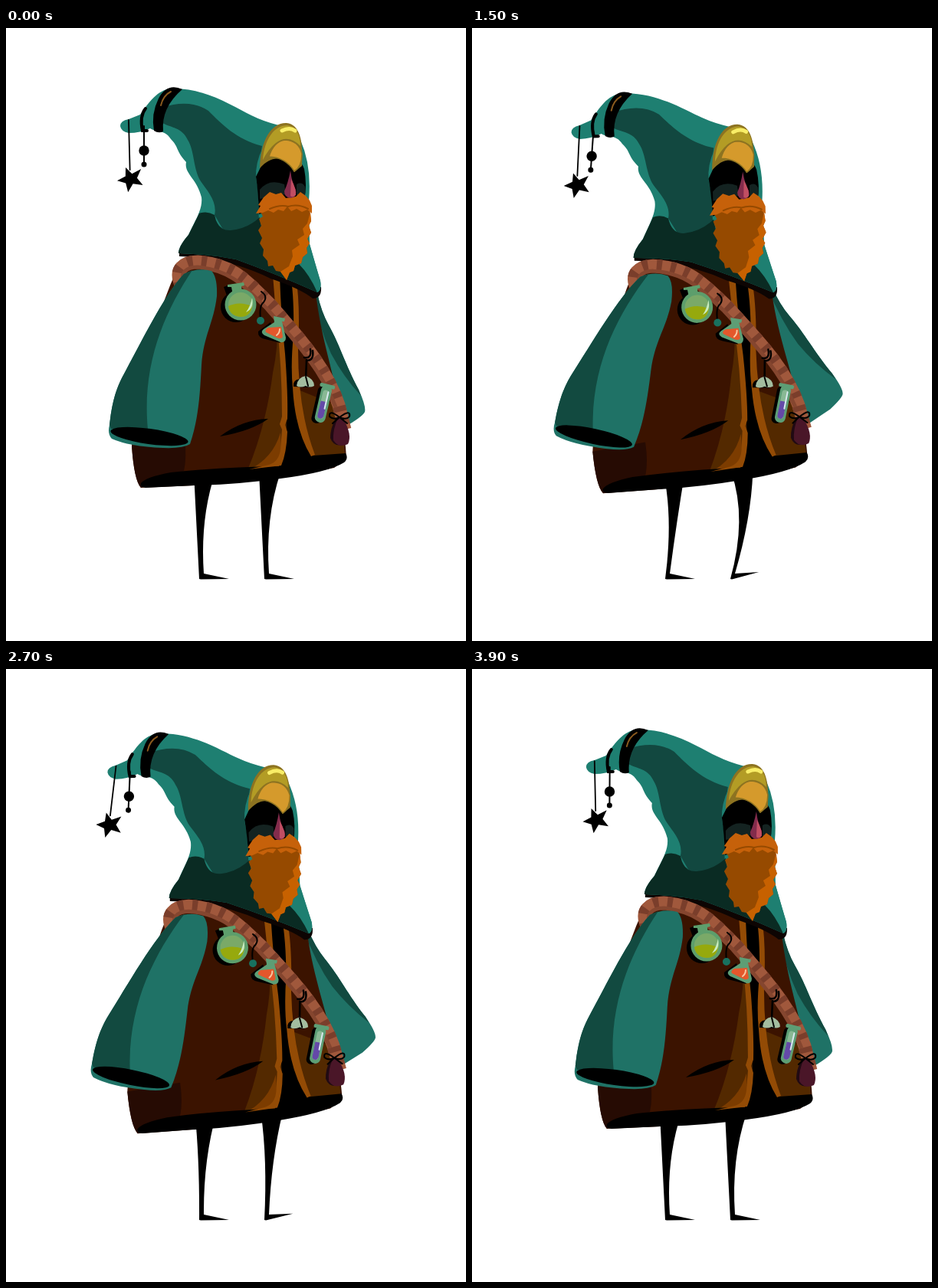
Animation of 600x800 px, one loop 4 s. Source, as an HTML page:

```html
<!DOCTYPE html>
<html lang="en">
<head>
<meta charset="utf-8">
<title>Swaying wizard</title>
<style>
html, body { margin: 0; width: 100%; height: 100%; overflow: hidden; background: #fff; }
svg { display: block; width: 600px; height: 800px; }
.line { fill: none; stroke: #000; stroke-linecap: round; }
</style>
</head>
<body>
<svg viewBox="0 0 600 800">
  <path id="legL"/>
  <path id="legR"/>
  <g id="body">
    <g id="armR">
      <path fill="#1f7266" d="M385 335L406 346Q411 370 421 388C436 415 442 438 460 472Q470 494 468 501Q466 506 448 517L416 530Z"/>
      <path fill="#124a40" d="M400 345L406 346Q411 370 421 388C436 415 442 438 460 472L463 480Q440 455 424 425Q408 390 400 345Z"/>
    </g>

    <g id="coat">
      <path fill="#3b1300" d="M225 310L300 295L404 345C412 420 440 480 444 562L428 574L360 587L245 597L176 600Q167 590 164 545Q172 430 225 310Z"/>
      <path fill="#260b03" d="M164 545L233 535Q236 560 232 578L176 600Q167 590 164 545Z"/>
      <path fill="#532900" d="M352 320Q359 400 348 450Q339 520 315 577L362 572L368 515L358 320Z"/>
      <path fill="#7c3c00" d="M358 528Q348 562 316 577L360 572Z"/>
      <path fill="#532900" d="M376 470L425 490L438 510L442 556L400 560Z"/>
      <path d="M354 320H376L376 440Q378 515 401 558L443 555Q447 562 441 567Q420 580 358 588Q300 596 245 597L182 600Q174 599 176 594Q182 586 215 580Q280 573 356 572L366 530L364 440Z"/>
      <path fill="#934b05" d="M348 322L357 324Q359 380 364 425Q368 480 367 510L364 518L367 527Q366 555 359 571L317 576L343 570Q356 566 358 550L360 524L357 517L360 507Q360 440 353 385Z"/>
      <path fill="#934b05" d="M371 322L378 324Q384 360 381 420Q381 500 403 557L398 559Q377 525 374 470Q371 440 375 400Q376 350 371 322Z"/>
      <path d="M279 533Q308 511 342 510Q320 526 279 533Z"/>
    </g>

    <path fill="#0d0503" d="M226 294Q265 290 300 300L348 314L411 338Q412 353 400 353Q384 340 345 327Q290 300 226 298Z"/>
    <g id="hat">
      <path fill="#1e7f71" d="M149 128Q149 121 160 119L175 113C190 92 200 79 219 79C262 79 297 103 320 114Q336 122 356 127L384 146Q399 180 395 225L396 282Q404 310 410 330Q412 342 406 345Q350 320 300 302Q265 295 225 294Q225 285 238 270C246 252 257 237 255 221C249 196 232 190 235 175C221 160 226 156 215 145C207 132 195 136 188 131Q175 137 160 137Q150 135 149 128Z"/>
      <path fill="#124840" d="M203 104Q240 92 264 108C282 126 300 145 334 154L328 190L330 256L290 275L272 244C276 226 262 212 254 200C244 184 246 160 237 146C230 130 215 130 204 124Z"/>
      <path fill="#0a2b23" d="M252 242Q262 238 272 244Q276 265 293 264Q315 262 331 247L340 300L384 306Q402 320 406 345Q350 320 300 302Q265 295 225 294Q225 285 238 270Z"/>
      <path fill="#1e7f71" d="M390 250L396 282Q404 310 410 330Q412 342 406 345Q396 322 382 308Z"/>
      <path d="M230 80Q210 71 199 92Q189 112 193 134Q199 138 205 135Q202 104 230 80Z"/>
      <path class="line" style="stroke:#8a5a1e" stroke-width="2" d="M215 83Q205 88 202 101"/>
      <path class="line" stroke-width="4" d="M182 105Q174 115 178 134L184 134"/>
    </g>

    <g id="face">
      <path fill="#1e7f71" d="M335 156Q325 176 326 196L331 226L336 168Z"/>
      <path d="M331 184Q338 163 360 164Q384 168 389 184Q393 205 389 225L330 243Q329 213 326 194Z"/>
      <path fill="#142321" d="M331 211Q343 196 363 204L365 217L331 223ZM379 204Q386 200 390 207V218H379Z"/>
      <path fill="#8d7321" d="M331 183C332 145 347 123 366 124C383 126 388 146 386 180L376 188C366 170 350 162 331 183Z"/>
      <path fill="#b39c25" d="M335 172C337 145 350 127 367 127C379 129 384 140 384 154Q368 138 352 150Q343 157 335 172Z"/>
      <path fill="#d59a2c" stroke="#8d7321" stroke-width="1.5" d="M343 168Q349 148 364 146Q382 147 386 164Q386 181 376 187Q365 169 343 168Z"/>
      <path class="line" style="stroke:#f8ed67" stroke-width="5" d="M360 134Q370 129 377 134"/>
    </g>
    <g id="beard">
      <path fill="#964a00" d="M335 226L331 238L335 246L330 249L333 258L329 264L334 274L331 281L336 289L335 297L341 304L342 311L348 310L352 317L358 318L366 329L370 319L375 317L377 310L385 307L387 299L393 294L392 287L396 281L393 275L398 267L395 258L398 252L395 226Z"/>
      <path fill="#c76100" d="M397 240L398 252L395 258L398 267L393 275L396 281L392 287L393 294L387 299L385 307L377 310L375 317L370 319L366 329L358 318L369 311L374 298L373 290L383 283L380 276L389 270L387 262L393 255Z"/>
    </g>
    <path fill="#c6610a" d="M326 242L332 232L329 231L336 221L344 214L352 217L359 215L365 222L378 220L384 214L391 219L396 225L399 232L399 242L393 237L386 240L379 236L372 239L367 233L362 239L355 237L349 241L342 238L335 241Z"/>
    <path class="line" style="stroke:#964a00" stroke-width="2" d="M344 236Q358 230 368 233Q381 229 394 236"/>
    <g id="nose">
      <path fill="#832c4c" d="M371 186Q373 203 378 211Q380 221 371 222Q363 221 363 213Q368 202 371 186Z"/>
      <path fill="#c14e63" d="M372 197Q379 211 378 218Q374 222 371 219Z"/>
    </g>

    <g fill="none" stroke-width="17">
      <path stroke="#a0583c" d="M229 337C218 314 232 305 250 305C300 309 316 333 345 361C377 399 417 440 434 492L442 524"/>
      <path stroke="#7a3e2b" stroke-dasharray="7 11" d="M229 337C218 314 232 305 250 305C300 309 316 333 345 361C377 399 417 440 434 492L442 524"/>
      <path stroke="#85462f" stroke-width="5" d="M233 334C226 320 235 312 250 312C295 316 312 339 340 366C371 402 411 445 430 495"/>
    </g>

    <g id="armL">
      <path fill="#1f7266" d="M232 321Q250 312 268 317Q276 325 275 350C271 385 258 400 255 440C253 480 251 510 240 543Q231 549 205 548Q160 546 138 536Q132 530 135 518C139 482 146 467 152 455C175 413 205 350 232 321Z"/>
      <path fill="#124a40" d="M232 321L243 316C206 372 177 440 185 524L137 523L135 518C139 482 146 467 152 455C175 413 205 350 232 321Z"/>
      <ellipse cx="187" cy="533" rx="51" ry="10" transform="rotate(8 187 533)"/>
    </g>

    <g id="flask">
      <circle cx="300" cy="364" r="20"/>
      <path d="M284 338L294 334L300 350L289 352Z"/>
      <path fill="#5d9e6c" d="M289 335L310 332L311 336L307 337L308 347L296 349L294 338L289 338Z"/>
      <circle cx="306" cy="361" r="20.5" fill="#5d9e6c"/>
      <circle cx="306" cy="361" r="16" fill="#7aa968"/>
      <path fill="#96a90d" d="M290 363Q304 356 321 363Q319 377 306 377Q292 376 290 363Z"/>
      <path fill="#c9ecc0" d="M321 352Q324 366 313 371Q319 363 321 352Z"/>
    </g>
    <g id="charm">
      <path class="line" stroke-width="2" d="M333 344Q342 350 336 358Q330 362 332 380"/>
      <circle cx="332" cy="382" r="5" fill="#18715f"/>
    </g>
    <g id="redFlask">
      <path d="M345 384L329 396Q328 404 338 406L358 411Z"/>
      <path fill="#5d9e75" d="M349 376L364 379L363 383L360 383L365 404Q365 411 358 410L337 401Q331 397 336 393L350 384Z"/>
      <path fill="#e4572b" d="M342 391L359 390L361 403Q359 407 353 404L339 397Q337 394 342 391Z"/>
      <path class="line" style="stroke:#f8c6a0" stroke-width="2" d="M357 393Q357 398 353 401"/>
    </g>
    <g id="mushroom">
      <path class="line" stroke-width="2.5" d="M389 430Q399 432 397 419M392 434Q402 434 400 421M392 433L391 458"/>
      <path d="M375 468Q374 459 383 458L397 469Z"/>
      <path fill="#a3bda0" d="M379 467Q380 456 391 454Q402 458 402 467Q396 470 391 467Q384 470 379 467Z"/>
      <path class="line" stroke-width="2" d="M391 455L394 467"/>
    </g>
    <g id="tube" transform="rotate(13 413 490)">
      <rect x="403" y="468" width="13" height="49" rx="6"/>
      <rect x="407" y="466" width="14" height="49" rx="6.5" fill="#5d9e75"/>
      <rect x="404" y="464" width="20" height="5" rx="2" fill="#5d9e75"/>
      <rect x="410" y="472" width="8" height="38" rx="4" fill="#89b894"/>
      <path fill="#6449a8" d="M410 487H418V506Q417 510 414 510Q410 510 410 506Z"/>
      <path class="line" style="stroke:#d8e8ee" stroke-width="2" d="M417 474V496"/>
    </g>
    <g id="bag">
      <path fill="#210a13" d="M430 509L440 510Q449 533 440 544Q427 547 423 535Q423 523 430 509Z"/>
      <path fill="#4a1628" d="M433 509L440 510Q452 531 446 543Q434 549 427 538Q426 524 433 509Z"/>
      <path class="line" stroke-width="2" d="M435 508Q421 497 422 507Q427 512 435 508Q450 497 448 507Q444 512 435 508L426 516M435 508L445 516"/>
    </g>

    <g id="star">
      <path class="line" stroke-width="1.8" d="M160 120V185"/>
      <path transform="rotate(-13 160 197)" d="M158 181L164 191L177 188L169 198L174 209L162 204L153 213L153 201L143 195L155 192Z"/>
    </g>
    <g id="beads">
      <path class="line" stroke-width="2" d="M180 128V178"/>
      <circle cx="180" cy="160" r="6.7"/>
      <circle cx="180" cy="178" r="3.5"/>
    </g>
  </g>
</svg>
<script>
const LOOP = 4000, STEP = 100;
const el = id => document.getElementById(id);
const ease = u => (1 - Math.cos(Math.PI * u)) / 2;
const turn = (id, angle, x, y) => el(id).setAttribute("transform", `rotate(${angle} ${x} ${y})`);

// Eased interpolation through [time, value] pairs.
function key(t, pairs) {
  const i = Math.max(1, pairs.findIndex(p => p[0] >= t));
  const [t0, v0] = pairs[i - 1], [t1, v1] = pairs[i];
  return v0 + (v1 - v0) * ease((t - t0) / (t1 - t0));
}

// Leg with hip at x, knee pushed out and toe raised by some pixels.
function leg(id, x, knee, toe) {
  const hip = knee * .32;
  el(id).setAttribute("d",
    `M${x + hip} 580Q${x + 3 + knee} 640 ${x + 7} 719L${x + 9} 719.5` +
    `L${x + 46 - toe / 5} ${719 - toe}L${x + 13} 712` +
    `Q${x + 8 + knee} 640 ${x + 28 + hip} 580Z`);
}

function draw(t) {
  const there = 1 - Math.abs(1 - t / 2000);
  const sway = ease(there), tilt = 2.06 * sway;
  turn("body", -tilt, 410, 765);
  turn("armL", 7 * sway, 250, 330);
  turn("armR", -13.2 * there, 360, 350);
  turn("beard", key(t, [[0, 0], [300, 0], [900, 2.8], [1500, -1.5], [2300, .6], [3100, -.4], [LOOP, 0]]), 365, 235);
  turn("star", tilt + key(there, [[0, -1.5], [.5, 9.5], [1, -4]]), 160, 122);
  turn("beads", tilt + 4 * Math.sin(2 * Math.PI * there) ** 2, 180, 106);

  const bend = key(t, [[0, 0], [1300, 1], [1700, 1], [3300, 0], [LOOP, 0]]);
  const toe = key(t, [[0, 0], [400, 9], [950, 0], [1500, 9], [2050, 0], [2600, 9], [3150, 0], [LOOP, 0]]);
  leg("legL", 245, bend * 14.5, 0);
  leg("legR", 330, bend * 26, toe);
}

const start = performance.now();
function tick() {
  const t = (performance.now() - start) % LOOP;
  draw(Math.floor(t / STEP) * STEP);
  requestAnimationFrame(tick);
}
tick();
</script>
</body>
</html>
```
